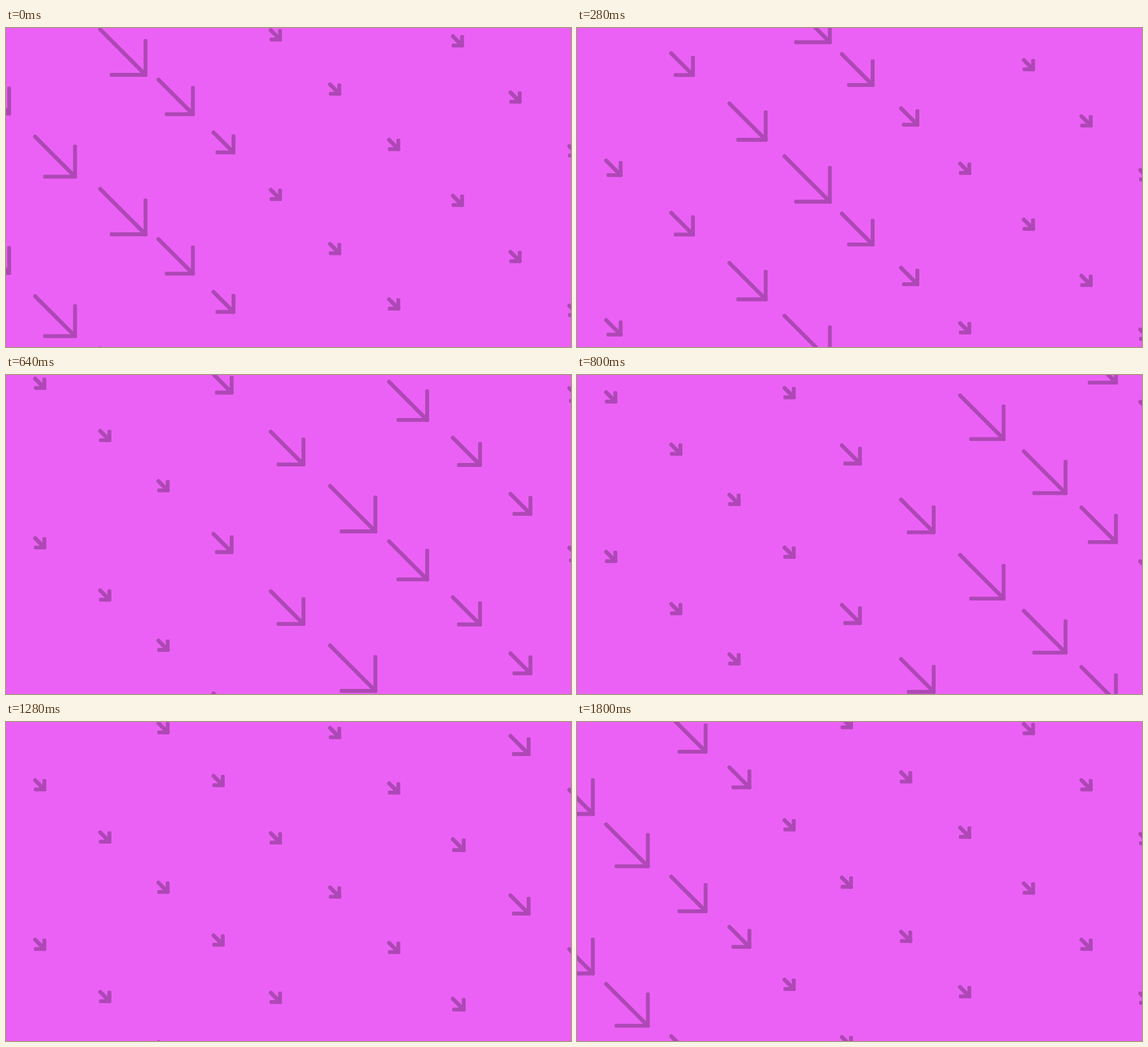
Animation of 997 by 562 pixels, one loop 1880 ms. Source, as an HTML page:

```html
<!DOCTYPE html>
<html lang="en">
<head>
<meta charset="utf-8">
<title>Arrow wave</title>
<style>
  html, body { margin: 0; width: 100%; height: 100%; overflow: hidden; background: #eb61f5; }
  svg { display: block; width: 100%; height: 100%; }
</style>
</head>
<body>
<svg viewBox="0 0 997 562" preserveAspectRatio="xMidYMid slice">
  <rect width="997" height="562" fill="#eb61f5"/>
  <path id="shafts" fill="none" stroke="#ae48b6" stroke-width="7" stroke-linecap="round"/>
  <path id="hooks" fill="#ae48b6" stroke="#ae48b6" stroke-width="4" stroke-linejoin="round"/>
</svg>
<script>
const LOOP = 1880, STEP = 40, LAST = 1800;
const ROW = 281, FALL = 0.15;
const MIN = 16.3, MAX = 80, RATE = 0.16, HOLD = 60, WAVE = 1960;

// Each column: tail x, tail y at time 0, moment of full size
const columns = [
  [-52, 93, -200], [51.4, 191.5, -120], [166.2, 283.5, -40], [269, 91, 120],
  [366.2, 184, 280], [467.3, 285, 440], [571.8, 99.5, 600], [676, 197, 720],
  [788.5, 14.5, 840], [890.2, 113.5, 920], [994, 208.3, 1000]
];

const shafts = document.getElementById('shafts');
const hooks = document.getElementById('hooks');

const pulse = u => Math.max(MIN, MAX - RATE * Math.max(-u, u - HOLD, 0));

function hookPath(x, y, size) {
  const arm = 0.7 * size + 5, half = 1.4;
  return `M${x - arm} ${y - half}H${x - half}V${y - arm}H${x + half}V${y + half}H${x - arm}Z`;
}

function draw(time) {
  let lines = '', corners = '';
  for (const [x, startY, peak] of columns) {
    const size = Math.max(pulse(time - peak), pulse(time - peak - WAVE));
    const top = (startY + time * FALL) % ROW;
    for (let row = -1; row <= 2; row++) {
      const y = top + row * ROW;
      lines += `M${x} ${y}l${size} ${size}`;
      corners += hookPath(x + size, y + size, size);
    }
  }
  shafts.setAttribute('d', lines);
  hooks.setAttribute('d', corners);
}

const start = performance.now();
function tick() {
  const time = (performance.now() - start) % LOOP;
  draw(Math.min(LAST, Math.floor(time / STEP) * STEP));
  requestAnimationFrame(tick);
}
tick();
</script>
</body>
</html>
```
